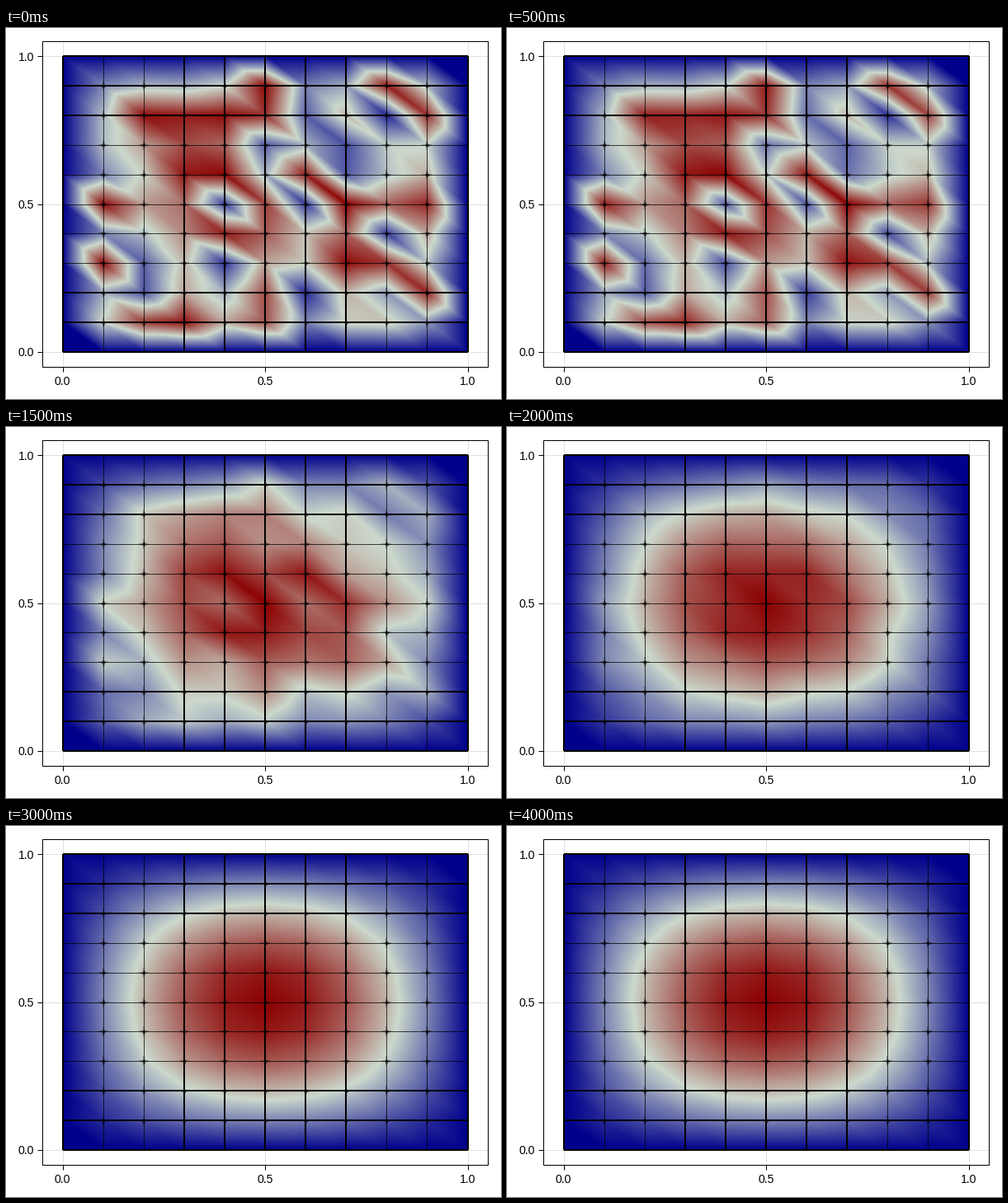
Animation of 600x450 px, one loop 4.5 s. Source, as a matplotlib script:

```python
import numpy as np
import matplotlib.pyplot as plt
from matplotlib.animation import FuncAnimation
from matplotlib.collections import LineCollection
from matplotlib.colors import LinearSegmentedColormap
from matplotlib.patches import Rectangle

W, H, DPI = 600, 450, 100
PX = 72 / DPI                       # one pixel in points
LEFT, RIGHT, TOP, BOTTOM = 68.5, 559.5, 34, 393
N = 10                              # cells per side
STEPS, INTERVAL = 9, 500

# Starting values at the inner nodes in percent, from the top row down
START = np.array([
    [30, 40, 38, 48, 97, 28, 38, 92, 42],
    [42, 95, 92, 95, 88, 20, 56, 8, 88],
    [42, 62, 80, 74, 18, 38, 16, 45, 48],
    [30, 50, 92, 95, 38, 90, 18, 42, 58],
    [95, 62, 72, 12, 82, 10, 97, 75, 90],
    [30, 42, 66, 90, 76, 52, 74, 12, 60],
    [95, 20, 55, 10, 60, 50, 95, 86, 44],
    [38, 18, 60, 38, 80, 8, 56, 34, 90],
    [50, 85, 95, 60, 80, 30, 52, 54, 35],
]) / 100

noise = np.pad(START[::-1], 1)
wave = np.sin(np.pi * np.arange(N + 1) / N)
mode = np.outer(wave, wave)

BLUES_REDS = LinearSegmentedColormap.from_list(
    "blues_reds", ["darkblue", (0.8, 0.85, 0.8), "darkred"], N=1024)


def node_x(t):
    return LEFT + t * (RIGHT - LEFT)


def node_y(t):
    return BOTTOM - t * (BOTTOM - TOP)


def solution(step):
    """Nodal values: the rough part fades geometrically against the mode."""
    ratio = 38 * 4.6 ** -step
    u = (ratio * noise + mode) / (ratio + 1)
    return u / u.max()


# Cell index and local coordinates of every sample
gx = (np.arange(982) + 0.5) / 982 * N
gy = (1 - (np.arange(718) + 0.5) / 718) * N
X, Y = np.meshgrid(gx, gy)
I, J = X.astype(int), Y.astype(int)
A, B = X - I, Y - J
LOWER = A + B < 1


def shade(u):
    """Linear interpolation on two triangles per cell."""
    ll, lr = u[J, I], u[J, I + 1]
    ul, ur = u[J + 1, I], u[J + 1, I + 1]
    low = ll + A * (lr - ll) + B * (ul - ll)
    high = ur + (1 - A) * (ul - ur) + (1 - B) * (lr - ur)
    return np.where(LOWER, low, high)


fig = plt.figure(figsize=(W / DPI, H / DPI), dpi=DPI, facecolor="white")
ax = fig.add_axes([0, 0, 1, 1])
ax.axis("off")


def lines(segments, width, alpha=1.0, color="black", z=3):
    ax.add_collection(LineCollection(
        segments, linewidths=width * PX, colors=color, alpha=alpha, zorder=z,
        capstyle="butt"))


def draw_axes():
    grid, ticks = [], []
    for t in (0, 0.5, 1):
        x, y = node_x(t), node_y(t)
        grid += [[(x, 16), (x, 411)], [(44, y), (584, y)]]
        ticks += [[(x, 411), (x, 417)], [(38, y), (44, y)]]
        font = dict(family="Liberation Sans", fontsize=14 * PX, color="black")
        ax.text(x, 427.5, f"{t:.1f}", ha="center", va="center_baseline", **font)
        ax.text(34, y, f"{t:.1f}", ha="right", va="center_baseline", **font)
    lines(grid, 1, 0.12, z=1)
    lines(ticks, 1)
    ax.add_patch(Rectangle((44, 15.5), 540, 395.5, fill=False,
                           ec="black", lw=PX, zorder=3))


def draw_mesh():
    thick, thin, short, long = [], [], [], []
    for k in range(N + 1):
        x, y = node_x(k / N), node_y(k / N)
        column = [(x, TOP), (x, BOTTOM)]
        row = [(LEFT, y), (RIGHT, y)]
        (thin if k in (1, 2, 8, 9) else thick).append(column)
        (thin if 3 <= k <= 7 else thick).append(row)
    for i in range(1, N):
        for j in range(1, N):
            x, y = node_x(i / N), node_y(j / N)
            for group, r in ((short, 2.5), (long, 6)):
                group += [[(x - r, y), (x + r, y)], [(x, y - r), (x, y + r)]]
    lines(thick, 2)
    lines(thin, 1, 0.72)
    lines(long, 1.6, 0.3, z=4)
    lines(short, 2.8, 0.45, z=4)


draw_axes()
draw_mesh()
field = ax.imshow(shade(solution(0)), cmap=BLUES_REDS, vmin=0, vmax=1,
                  extent=(LEFT, RIGHT, BOTTOM, TOP), aspect="auto",
                  interpolation="nearest", zorder=2)
ax.set_xlim(0, W)
ax.set_ylim(H, 0)


def update(step):
    field.set_data(shade(solution(step)))
    return (field,)


anim = FuncAnimation(fig, update, frames=STEPS, interval=INTERVAL,
                     repeat=True, repeat_delay=0, blit=False)
plt.show()
```
